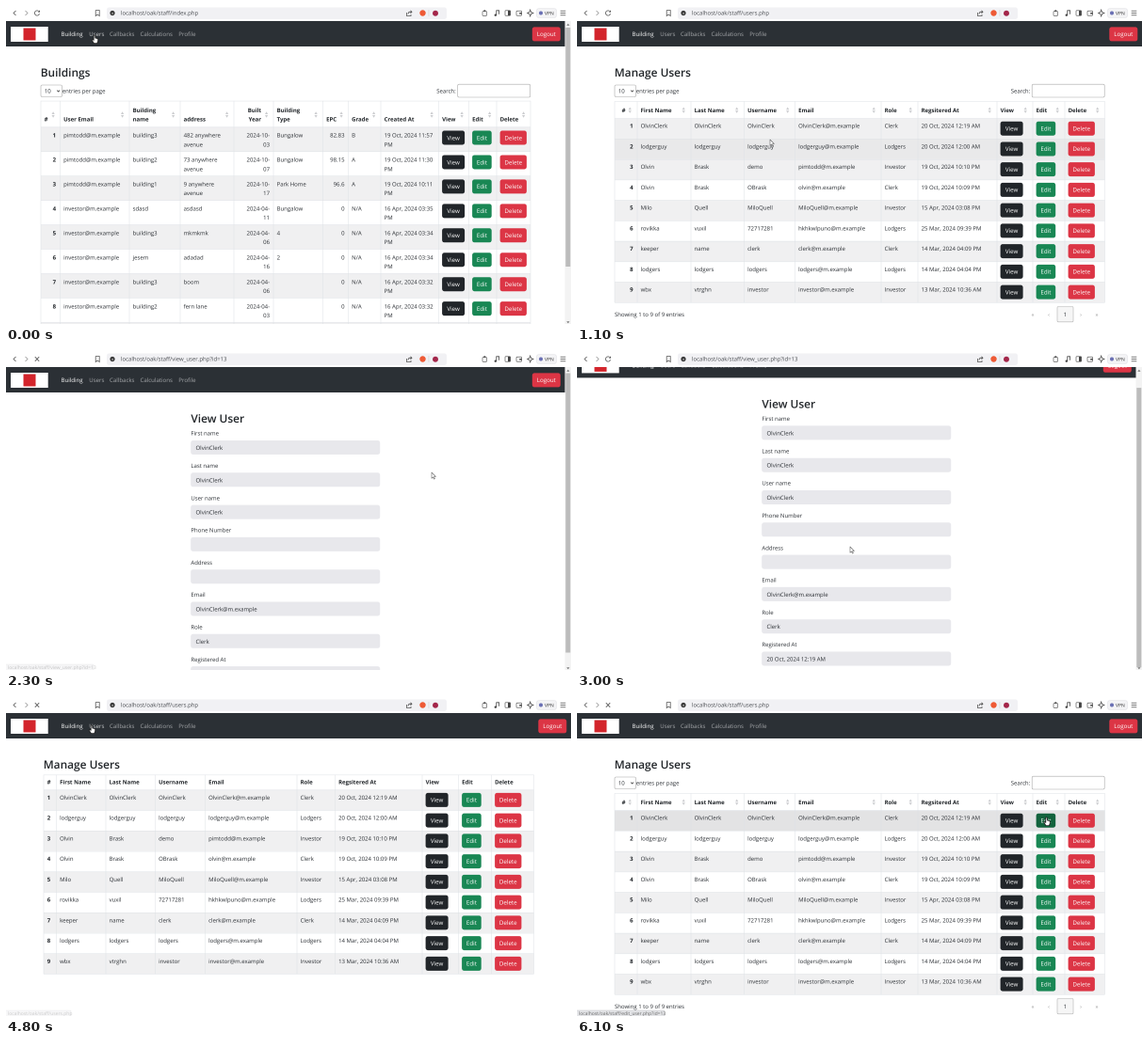
These frames come from a looping animation (600 px wide and 338 px high, 6.2 s). An HTML page with a canvas:

```html
<!DOCTYPE html>
<html lang="en">
<head>
<meta charset="utf-8">
<style>
html, body { margin: 0; width: 100%; height: 100%; overflow: hidden; background: #fff; }
canvas { display: block; width: 600px; height: 338px; }
</style>
</head>
<body>
<canvas id="stage"></canvas>
<script>
const canvas = document.getElementById('stage');
const ctx = canvas.getContext('2d');
// a doubled backing store keeps the tiny text smooth
const scale = 2 * (window.devicePixelRatio || 1);
canvas.width = 600 * scale;
canvas.height = 338 * scale;
ctx.textRendering = 'geometricPrecision';

const LOOP = 6200, STEP = 100;
const FONT = '"Open Sans", "Noto Sans", sans-serif';
const INK = '#2a2e33', LINE = '#dee2e6', RED = '#dc3545', GREEN = '#198754', DARK = '#212529';
const BASE = 'localhost/oak/staff/';

const users = [
  'OlvinClerk|OlvinClerk|OlvinClerk|OlvinClerk@m.example|Clerk|20 Oct, 2024 12:19 AM',
  'lodgerguy|lodgerguy|lodgerguy|lodgerguy@m.example|Lodgers|20 Oct, 2024 12:00 AM',
  'Olvin|Brask|demo|pimtodd@m.example|Investor|19 Oct, 2024 10:10 PM',
  'Olvin|Brask|OBrask|olvin@m.example|Clerk|19 Oct, 2024 10:09 PM',
  'Milo|Quell|MiloQuell|MiloQuell@m.example|Investor|15 Apr, 2024 03:08 PM',
  'rovikka|vuxil|72717281|hkhkwlpuno@m.example|Lodgers|25 Mar, 2024 09:39 PM',
  'keeper|name|clerk|clerk@m.example|Clerk|14 Mar, 2024 04:09 PM',
  'lodgers|lodgers|lodgers|lodgers@m.example|Lodgers|14 Mar, 2024 04:04 PM',
  'wbx|vtrghn|investor|investor@m.example|Investor|13 Mar, 2024 10:36 AM'
].map(r => r.split('|'));

// "/" marks a line break inside a cell
const buildings = [
  'pimtodd@m.example|building3|482 anywhere/avenue|2024-10-/03|Bungalow|82.83|B|19 Oct, 2024 11:57/PM',
  'pimtodd@m.example|building2|73 anywhere/avenue|2024-10-/07|Bungalow|98.15|A|19 Oct, 2024 11:30/PM',
  'pimtodd@m.example|building1|9 anywhere/avenue|2024-10-/17|Park Home|96.6|A|19 Oct, 2024 10:11/PM',
  'investor@m.example|sdasd|asdasd|2024-04-/11|Bungalow|0|N/A|16 Apr, 2024 03:35/PM',
  'investor@m.example|building3|mkmkmk|2024-04-/06|4|0|N/A|16 Apr, 2024 03:34/PM',
  'investor@m.example|jesem|adadad|2024-04-/16|2|0|N/A|16 Apr, 2024 03:34/PM',
  'investor@m.example|building3|boom|2024-04-/06||0|N/A|16 Apr, 2024 03:32/PM',
  'investor@m.example|building2|fern lane|2024-04-/03||0|N/A|16 Apr, 2024 03:32/PM'
].map(r => r.split('|'));

const userHeads = ['#', 'First Name', 'Last Name', 'Username', 'Email', 'Role', 'Regsitered At', 'View', 'Edit', 'Delete'];
const buildingHeads = ['#', 'User Email', 'Building/name', 'address', 'Built/Year', 'Building/Type', 'EPC', 'Grade',
  'Created At', 'View', 'Edit', 'Delete'];
const sortedCols = [40, 64, 121, 177.5, 231.5, 323, 362, 446, 484, 518, 560.5];
const plainCols = [40, 53.5, 106, 158.5, 211.5, 309, 349.5, 442, 480.5, 515.5, 560.5];
const buildingCols = [37, 57.5, 131, 185, 242, 284, 336.5, 363.5, 398, 459.5, 491.5, 521, 557];

// pointer path: time, x, y of the tip
const path = [[0, 94, 31], [700, 92, 29], [800, 100, 42], [1100, 205, 142], [1500, 318, 150], [2000, 445, 134],
  [2200, 456, 128], [2300, 452, 128], [2800, 290, 207], [3500, 290, 207], [3800, 170, 90], [4100, 91, 29],
  [4900, 91, 29], [5200, 200, 92], [5600, 478, 128], [5700, 497, 127], [6200, 499, 127]];

function keyed(keys, t) {
  const i = Math.max(1, keys.findIndex(k => k[0] >= t));
  const a = keys[i - 1], b = keys[i];
  const p = (t - a[0]) / (b[0] - a[0]);
  return a.slice(1).map((v, j) => v + (b[j + 1] - v) * p);
}

function text(s, x, y, { size = 6, weight = 400, color = INK, align = 'left' } = {}) {
  ctx.font = `${weight} ${size}px ${FONT}`;
  ctx.fillStyle = color;
  ctx.textAlign = align;
  ctx.fillText(s, x, y);
}

function rect(x, y, w, h, fill) {
  ctx.fillStyle = fill;
  ctx.fillRect(x, y, w, h);
}

function box(x, y, w, h, r, fill, border) {
  ctx.beginPath();
  ctx.roundRect(x, y, w, h, r);
  if (fill) { ctx.fillStyle = fill; ctx.fill(); }
  if (border) { ctx.strokeStyle = border; ctx.lineWidth = 0.6; ctx.stroke(); }
}

function poly(points, fill, stroke, width = 0.8, close = true) {
  ctx.beginPath();
  points.forEach(([x, y]) => ctx.lineTo(x, y));
  if (close) ctx.closePath();
  if (fill) { ctx.fillStyle = fill; ctx.fill(); }
  if (stroke) { ctx.strokeStyle = stroke; ctx.lineWidth = width; ctx.stroke(); }
}

const line = (points, color = '#555', width = 0.8) => poly(points, null, color, width, false);

function disc(x, y, r, fill) {
  ctx.beginPath();
  ctx.arc(x, y, r, 0, 7);
  ctx.fillStyle = fill;
  ctx.fill();
}

function button(label, x, y, w, fill) {
  box(x, y, w, 15, 2.4, fill);
  text(label, x + w / 2, y + 9.8, { color: '#fff', align: 'center', size: 6.2 });
}

function toolbar(url, loading) {
  rect(0, 0, 600, 16, '#fff');
  line([[10.5, 5], [8, 7.5], [10.5, 10]]);
  line([[20.5, 5], [23, 7.5], [20.5, 10]], '#999');
  if (loading) {
    line([[30.8, 5.2], [35.2, 9.8]]);
    line([[35.2, 5.2], [30.8, 9.8]]);
  } else {
    ctx.beginPath();
    ctx.arc(33, 7.5, 2.6, 0.3, 5.4);
    ctx.strokeStyle = '#555';
    ctx.lineWidth = 0.8;
    ctx.stroke();
    poly([[33.8, 6.6], [36, 6.6], [36, 4.4]], '#555');
  }
  line([[95.2, 4.5], [99.2, 4.5], [99.2, 10.6], [97.2, 9], [95.2, 10.6], [95.2, 4.5]]);
  box(107, 1.5, 361, 12.5, 2.5, '#f1f1f4');
  disc(113, 7.5, 2.6, '#333');
  rect(112.7, 6.8, 0.7, 2.2, '#fff');
  text(url, 122, 9.7, { color: '#45484d' });

  line([[425.5, 7], [425.5, 10.5], [430, 10.5], [430, 9]]);
  line([[426.8, 8.5], [428, 6.3], [431, 6.3]]);
  line([[429.5, 4.8], [431, 6.3], [429.5, 7.8]]);
  disc(442.5, 7.5, 3.2, '#ee5a35');
  rect(448.7, 4, 0.5, 7, '#ccc');
  disc(456, 7.7, 3, '#a3264a');

  box(506, 5.7, 4.6, 4.6, 0.8, null, '#444');
  disc(508.3, 5.2, 1.1, '#555');
  disc(519.8, 9.7, 1.2, '#444');
  line([[520.8, 9.7], [520.8, 4.8], [523.6, 4.8], [523.6, 8.7]], '#444');
  box(530, 4.8, 5.6, 5.4, 0.6, null, '#444');
  rect(533, 5, 2.5, 5, '#444');
  box(542, 5.2, 5.6, 5, 0.8, null, '#444');
  rect(545.2, 7, 2.4, 1.5, '#444');
  poly([[556.7, 4], [557.6, 6.6], [560, 7.5], [557.6, 8.4], [556.7, 11], [555.8, 8.4], [553.6, 7.5], [555.8, 6.6]], null, '#444', 0.7);
  box(563.5, 2.5, 21, 10, 2.5, '#f3f3f5', '#e2e2e6');
  disc(568, 7.5, 2, '#6a70b4');
  text('VPN', 572, 9.4, { size: 5, color: '#333' });
  [5.2, 7.5, 9.8].forEach(y => rect(588.7, y - 0.4, 5.6, 0.8, '#555'));
}

function navbar(width, hover) {
  rect(0, 16, width, 27, '#2b3035');
  rect(5, 22, 39.7, 16, '#fff');
  rect(18.5, 23.5, 13, 13, '#d3252c');
  [['Building', 58.5], ['Users', 88.3], ['Callbacks', 110], ['Calculations', 142.5], ['Profile', 183.3]].forEach(([s, x], i) =>
    text(s, x, 32.2, { size: 6.1, weight: i ? 400 : 500, color: i === 0 ? '#fff' : i === 1 && hover ? '#cacbcd' : '#a6a8ab' }));
  button('Logout', width - 34.7, 22.4, 30, RED);
}

function scrollbar(top, height) {
  rect(593.5, 16, 6.5, 322, '#f3f3f3');
  rect(594.3, top, 5, height, '#bcbcbc');
  poly([[595.3, 20.8], [598.5, 20.8], [596.9, 18.8]], '#777');
  poly([[595.3, 335.2], [598.5, 335.2], [596.9, 337.2]], '#777');
}

function heading(s, x) {
  text(s, x, 75, { size: 11.9, weight: 600, color: '#212529' });
}

function controls(left, right) {
  box(left, 84, 22.5, 12.5, 1.5, '#fff', '#aaa');
  text('10', left + 3.8, 92.5);
  line([[left + 17.2, 89.6], [left + 18.6, 91], [left + 20, 89.6]], '#333');
  text('entries per page', left + 22.8, 92.5);
  text('Search:', right - 79.3, 92.5, { align: 'right' });
  box(right - 77.3, 83.2, 77, 13.8, 1.5, '#fff', '#aaa');
}

function sorter(x, y) {
  poly([[x - 1.6, y - 0.5], [x + 1.6, y - 0.5], [x, y - 3.2]], '#cccdd0');
  poly([[x - 1.6, y + 0.5], [x + 1.6, y + 0.5], [x, y + 3.2]], '#cccdd0');
}

function lines(s, x, y, options, split = true) {
  (split ? s.split('/') : [s]).forEach((part, i) => text(part, x, y + i * 9.7, options));
}

function grid(cols, top, head, rowH, count, hovered) {
  const left = cols[0], right = cols[cols.length - 1], first = top + head;
  for (let i = 0; i < count; i++) {
    const fill = i === hovered ? (i % 2 ? '#e9e9ea' : '#e3e3e4') : i % 2 ? '#fff' : '#f0f0f1';
    rect(left, first + i * rowH, right - left, rowH, fill);
    rect(left, first + i * rowH, right - left, 0.5, LINE);
  }
  rect(left, top, right - left, 0.5, LINE);
  rect(left, first + count * rowH, right - left, 0.5, LINE);
  cols.forEach(x => rect(x - 0.25, top, 0.5, head + count * rowH, LINE));
}

function actions(cols, y, pressed) {
  const [view, edit, del] = cols.slice(-4).map(x => x + 3.6);
  button('View', view, y, 24, pressed === 'view' ? '#3a3e42' : DARK);
  button('Edit', edit, y, 20.6, pressed === 'edit' ? '#12633d' : GREEN);
  button('Delete', del, y, 28.3, RED);
}

function buildingsPage() {
  const cols = buildingCols, top = 100.8, head = 27.8, rowH = 25.95;
  navbar(593.5, true);
  heading('Buildings', 36.7);
  controls(37, 557);
  grid(cols, top, head, rowH, 9, -1);
  buildingHeads.forEach((s, i) => {
    const y = s.includes('/') ? 112.8 : 122.5;
    const bold = { weight: 700, color: DARK };
    if (i === 4) lines(s, 271, y, { ...bold, align: 'right' });
    else lines(s, cols[i] + 3.6, y, bold);
    sorter(cols[i + 1] - 7.4, 115.5);
  });
  buildings.forEach((row, r) => {
    const y = top + head + r * rowH;
    text(r + 1, 53, y + 11, { weight: 700, align: 'right', color: DARK });
    row.forEach((s, c) => {
      const numeric = c === 3 || c === 5;
      lines(s, numeric ? cols[c + 2] - 4 : cols[c + 1] + 3.6, y + 11, { align: numeric ? 'right' : 'left' }, s !== 'N/A');
    });
    actions(cols, y + 3.9);
  });
  scrollbar(23, 254);
}

function usersPage(sorted, t, x, y) {
  const cols = sorted ? sortedCols : plainCols;
  const top = sorted ? 101.3 : 81.6, head = sorted ? 18.1 : 16, rowH = 21.74, first = top + head;
  const hovered = sorted && x > 40 && x < 560 ? Math.floor((y - first) / rowH) : -1;
  navbar(600, overLink(x, y));
  heading('Manage Users', 39.7);
  grid(cols, top, head, rowH, 9, hovered);
  userHeads.forEach((s, i) => {
    text(s, i === 0 && sorted ? 47.6 : cols[i] + 3.6, top + (sorted ? 11.8 : 10), { weight: 700, color: DARK });
    if (sorted) sorter(cols[i + 1] - 7.8, 110.7);
  });
  users.forEach((row, r) => {
    const rowY = first + r * rowH;
    text(r + 1, sorted ? 59.5 : 47.2, rowY + 10.3, { weight: 700, align: 'right', color: DARK });
    row.forEach((s, c) => text(s, cols[c + 1] + 3.6, rowY + 10.3));
    const pressed = r === 0 && sorted && (t >= 5700 ? 'edit' : t >= 2100 && t < 2300 ? 'view' : '');
    actions(cols, rowY + 3.3, pressed);
  });
  if (!sorted) return;
  controls(40, 560.5);
  text('Showing 1 to 9 of 9 entries', 40, 330);
  box(510, 319.5, 17, 16.3, 1.2, '#f6f6f6', '#b5b5b5');
  [['«', 484], ['‹', 501], ['1', 518.5], ['›', 535], ['»', 552]].forEach(([s, px]) =>
    text(s, px, 330, { align: 'center', color: s === '1' ? INK : '#999' }));
}

function profilePage(scroll, x, y) {
  ctx.save();
  ctx.beginPath();
  ctx.rect(0, 16, 600, 322);
  ctx.clip();
  ctx.translate(0, -scroll);
  navbar(593.5, overLink(x, y));
  heading('View User', 196.4);
  [['First name', 'OlvinClerk'], ['Last name', 'OlvinClerk'], ['User name', 'OlvinClerk'], ['Phone Number', ''], ['Address', ''],
    ['Email', 'OlvinClerk@m.example'], ['Role', 'Clerk'], ['Registered At', '20 Oct, 2024 12:19 AM']].forEach(([label, value], i) => {
    const top = 94 + i * 34.3;
    text(label, 196.4, top - 5.3);
    box(196.2, top, 201, 15, 2.5, '#e8e8ec');
    text(value, 201.5, top + 10);
  });
  ctx.restore();
  scrollbar(22.5 + scroll, 297);
}

function statusBar(path, alpha) {
  ctx.globalAlpha = alpha;
  box(-2, 332, path.length > 10 ? 95 : 71, 8, 1, '#e4e5e8', '#c8c8cc');
  text(BASE + path, 2, 336.9, { size: 5, color: '#666' });
  ctx.globalAlpha = 1;
}

const overLink = (x, y) => x > 86 && x < 106 && y > 25 && y < 37;

function pointer(x, y, hand) {
  ctx.save();
  ctx.translate(x, y);
  ctx.lineJoin = 'round';
  if (hand) {
    poly([[-0.8, 0], [0.6, 0], [0.8, 3], [3.6, 3.8], [3.7, 6.2], [2.8, 8.6], [-0.6, 8.6], [-2.8, 5.2], [-2, 4.5], [-0.8, 5.4]], '#fff', '#222', 0.8);
  } else {
    poly([[0, 0], [0, 6.3], [1.5, 5], [2.5, 7.1], [3.4, 6.7], [2.5, 4.6], [4.4, 4.5]], '#fff', '#666', 0.6);
  }
  ctx.restore();
}

function draw(t) {
  const [x, y] = keyed(path, t);
  const scroll = keyed([[0, 0], [2800, 0], [3000, 15.6], [3150, 15.6], [3350, 0], [6200, 0]], t)[0];
  const viewing = t >= 2300 && t < 4700;
  const within = (a, b) => t >= a && t < b;

  ctx.setTransform(scale, 0, 0, scale, 0, 0);
  rect(0, 0, 600, 338, '#fff');
  if (t < 400) buildingsPage();
  else if (viewing) profilePage(scroll, x, y);
  else usersPage(!within(400, 500) && !within(4700, 4900), t, x, y);

  const page = t < 400 ? 'index.php' : viewing ? 'view_user.php?id=13' : 'users.php';
  toolbar(BASE + page, within(300, 500) || within(2200, 2400) || within(4600, 4900) || t >= 5900);

  if (within(200, 400) || within(4300, 4700)) statusBar('users.php', 1);
  if (within(4700, 4900)) statusBar('users.php', 0.3);
  if (within(2200, 2400)) statusBar('view_user.php?id=13', t < 2300 ? 1 : 0.35);
  if (t >= 5800) statusBar('edit_user.php?id=13', 1);

  pointer(x, y, overLink(x, y) || within(2100, 2300) || t >= 5700);
}

function tick(now) {
  draw(Math.floor((now % LOOP) / STEP) * STEP);
  requestAnimationFrame(tick);
}
draw(0);
requestAnimationFrame(tick);
</script>
</body>
</html>
```
